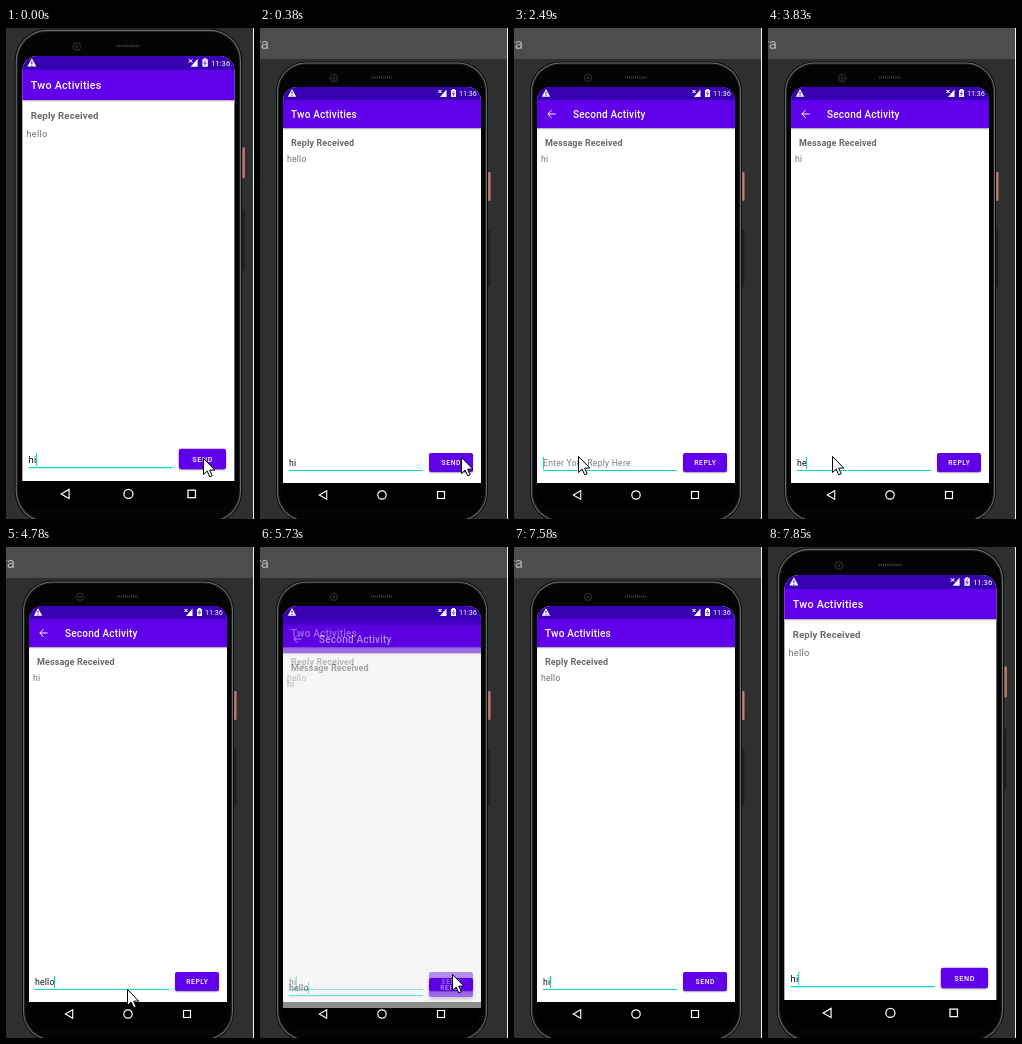
Recreate the animation shown at these times as an HTML page with a canvas. Size 248x491 px, loop 7950 ms.

```html
<!DOCTYPE html>
<html lang="en">
<head>
<meta charset="utf-8">
<title>Two Activities</title>
<style>
html, body { margin: 0; width: 100%; height: 100%; overflow: hidden; background: #2d2f31; }
canvas { display: block; }
</style>
</head>
<body>
<canvas width="248" height="491"></canvas>
<script>
const stage = document.querySelector('canvas').getContext('2d');
const layer = stage.canvas.cloneNode().getContext('2d');
let ctx = stage;

const LOOP = 7950, TICKS = 60;
const ZOOM_OUT = 3, ZOOM_IN = 59;
const OPEN = 4, CLOSE = 42, FADE = 2;
const PRESSES = [4, 41];
const KEYSTROKES = [26, 29, 32, 34, 34.45];
const BLINK = 3.75, BLINK_STARTS = [-.8, 3.65, ...KEYSTROKES];
// Pointer moves: from tick, to tick, x, y
const MOVES = [
  [0, 2, 201, 429], [8, 10, 170, 414], [10, 12, 95, 451], [12, 13, 66, 432],
  [13, 14, 66, 424], [17, 19, 64, 428], [35, 36, 121, 442], [36, 40, 192, 427], [47, 50, 166, 500]
];
const PURPLE = '#6000ea', DARK_PURPLE = '#3700b3', TEAL = '#03dac5';

const clamp = v => Math.min(1, Math.max(0, v));

function rect(x, y, w, h, color, radius = 0) {
  ctx.fillStyle = color;
  ctx.beginPath();
  ctx.roundRect(x, y, w, h, radius);
  ctx.fill();
}

function path(points, { fill, stroke, width = 1, open } = {}) {
  ctx.beginPath();
  points.forEach(([x, y]) => ctx.lineTo(x, y));
  if (!open) ctx.closePath();
  if (fill) { ctx.fillStyle = fill; ctx.fill(); }
  if (stroke) { ctx.strokeStyle = stroke; ctx.lineWidth = width; ctx.stroke(); }
}

function ring(x, y, r, color, width) {
  ctx.strokeStyle = color;
  ctx.lineWidth = width;
  ctx.beginPath();
  ctx.arc(x, y, r, 0, 7);
  ctx.stroke();
}

function text(str, x, y, size, color, { weight = 400, spacing = .2, align = 'left' } = {}) {
  ctx.font = `${weight} ${size}px Roboto, sans-serif`;
  ctx.letterSpacing = spacing + 'px';
  ctx.textAlign = align;
  ctx.fillStyle = color;
  ctx.fillText(str, x, y);
  return ctx.measureText(str).width;
}

function button(label, pressAge) {
  const pressed = pressAge >= 0 && pressAge < 3;
  ctx.save();
  ctx.shadowColor = 'rgba(0,0,0,.35)';
  ctx.shadowBlur = pressed ? 4 : 1.5;
  ctx.shadowOffsetY = pressed ? 2 : 1;
  rect(169, 425, 44, 19, PURPLE, 2);
  ctx.restore();
  if (pressAge === 1) rect(169, 425, 44, 19, 'rgba(255,255,255,.22)', 2);
  text(label, 191.3, 437.2, 6.75, '#fff', { weight: 500, spacing: .6, align: 'center' });
}

function activity({ title, back, heading, message, input, hint, label }, caret, pressAge) {
  rect(23, 59, 198, 396, '#fff');
  rect(23, 59, 198, 13, DARK_PURPLE);
  rect(23, 72, 198, 28, PURPLE);
  rect(23, 100, 198, 1, '#b8b8b8');
  rect(23, 101, 198, 1, '#ececec');
  if (back) {
    path([[41.5, 86], [33.8, 86]], { stroke: '#fff', open: true });
    path([[37.6, 82.2], [33.8, 86], [37.6, 89.8]], { stroke: '#fff', open: true });
  }
  text(title, back ? 59 : 31, 90, 10, '#fff', { weight: 500 });
  text(heading, 31, 118, 9, '#6a6a6a', { weight: 700, spacing: .1 });
  text(message, 27, 134.3, 8.7, '#707070');
  const width = text(input, 29, 438.3, 8.7, '#111');
  if (!input) text(hint, 29, 438.3, 8.7, '#7c7c7c');
  if (caret) rect(Math.round(28.6 + width), 429, 1, 12, TEAL);
  rect(29, 442, 134, 1, TEAL);
  button(label, pressAge);
}

function phone() {
  rect(228.2, 144, 2.3, 29, '#c67c70', 1);
  rect(228.2, 202, 2, 57, '#1c1d1f', 1);
  ['#0c0c0d', '#696b6d', '#1e1f20', '#040404'].forEach((color, i) =>
    rect(16 + i, 33.5 + i, 212 - 2 * i, 461 - 2 * i, color, 30 - i));
  ring(74, 50, 3.4, '#1d1f22', 2);
  rect(73, 49, 2, 2, '#34405c', 1);
  for (let x = 111; x < 133; x += 2) rect(x, 48.5, 1.2, 2, '#3a3b3d');
}

function systemBars() {
  path([[32, 61], [36.2, 68.8], [27.8, 68.8]], { fill: '#fff' });
  rect(31.5, 63.7, 1, 2.6, DARK_PURPLE);
  rect(31.5, 67, 1, 1, DARK_PURPLE);
  path([[186.5, 61.5], [186.5, 69], [180, 69]], { fill: '#fff' });
  path([[178.5, 62], [181.5, 65]], { stroke: '#fff', width: .8 });
  path([[181.5, 62], [178.5, 65]], { stroke: '#fff', width: .8 });
  rect(191, 62, 5, 7, '#fff', .5);
  rect(192.3, 61, 2.4, 1, '#fff');
  path([[194, 63], [192.4, 65.8], [194.6, 65.4], [193, 68]], { stroke: DARK_PURPLE, width: .7, open: true });
  text('11:36', 199, 68, 7.2, '#fff', { spacing: 0 });

  path([[59.3, 467], [66.7, 462.8], [66.7, 471.2]], { stroke: '#fff', width: 1.1 });
  ring(122, 467, 4.2, '#fff', 1.2);
  ctx.strokeRect(177.5, 463.5, 7, 7);
}

function pointer(tick) {
  let x = 197, y = 430;
  for (const [from, to, toX, toY] of MOVES) {
    const p = clamp((tick - from) / (to - from));
    x += (toX - x) * p;
    y += (toY - y) * p;
  }
  const shape = [[0, 0], [0, 16], [3.7, 12.6], [6.2, 18.3], [8.7, 17.2], [6.2, 11.6], [11.3, 11.6]];
  path(shape.map(([dx, dy]) => [x + .5 + dx, y + .5 + dy]), { fill: '#fff', stroke: '#000' });
}

function screens(tick) {
  const blinkStart = BLINK_STARTS.findLast(start => start <= tick);
  const caret = Math.floor((tick - blinkStart) / BLINK) % 2 === 0;
  const presence = clamp(Math.min(tick - OPEN, CLOSE + FADE - tick) / FADE);

  activity({
    title: 'Two Activities', heading: 'Reply Received', message: 'hello', input: 'hi', label: 'SEND'
  }, caret, tick - PRESSES[0]);
  if (!presence) return;

  // The second screen is composed apart so that it fades as one piece
  ctx = layer;
  activity({
    title: 'Second Activity', back: true, heading: 'Message Received', message: 'hi', label: 'REPLY',
    input: 'hello'.slice(0, KEYSTROKES.filter(key => key <= tick).length), hint: 'Enter Your Reply Here'
  }, caret, tick - PRESSES[1]);
  ctx = stage;
  rect(23, 72, 198, 383, 'rgba(0,0,0,.08)');
  ctx.globalAlpha = presence ** .85;
  ctx.drawImage(layer.canvas, 23, 59, 198, 396, 23, 59 + 12 * (1 - presence), 198, 396);
  ctx.globalAlpha = 1;
}

function draw(tick) {
  rect(0, 0, 248, 491, '#2d2f31');
  ctx.save();
  if (tick < ZOOM_OUT || tick >= ZOOM_IN) ctx.transform(1.073, 0, 0, 1.073, -8.5, -35.2);
  rect(0, 0, 248, 31, '#4b4d4e');
  text('ra', 9, 21, 15, '#b4b6b7', { spacing: 0, align: 'right' });
  phone();

  ctx.beginPath();
  ctx.roundRect(23, 59, 198, 420, 14);
  ctx.clip();
  rect(23, 59, 198, 420, '#000');
  screens(tick);
  systemBars();
  ctx.restore();

  pointer(tick);
  rect(247, 0, 1, 491, '#f0f0f0');
}

const start = performance.now();
function frame() {
  const t = (performance.now() - start) % LOOP;
  draw(Math.floor(t / LOOP * TICKS + .23));
  requestAnimationFrame(frame);
}
frame();
</script>
</body>
</html>
```
